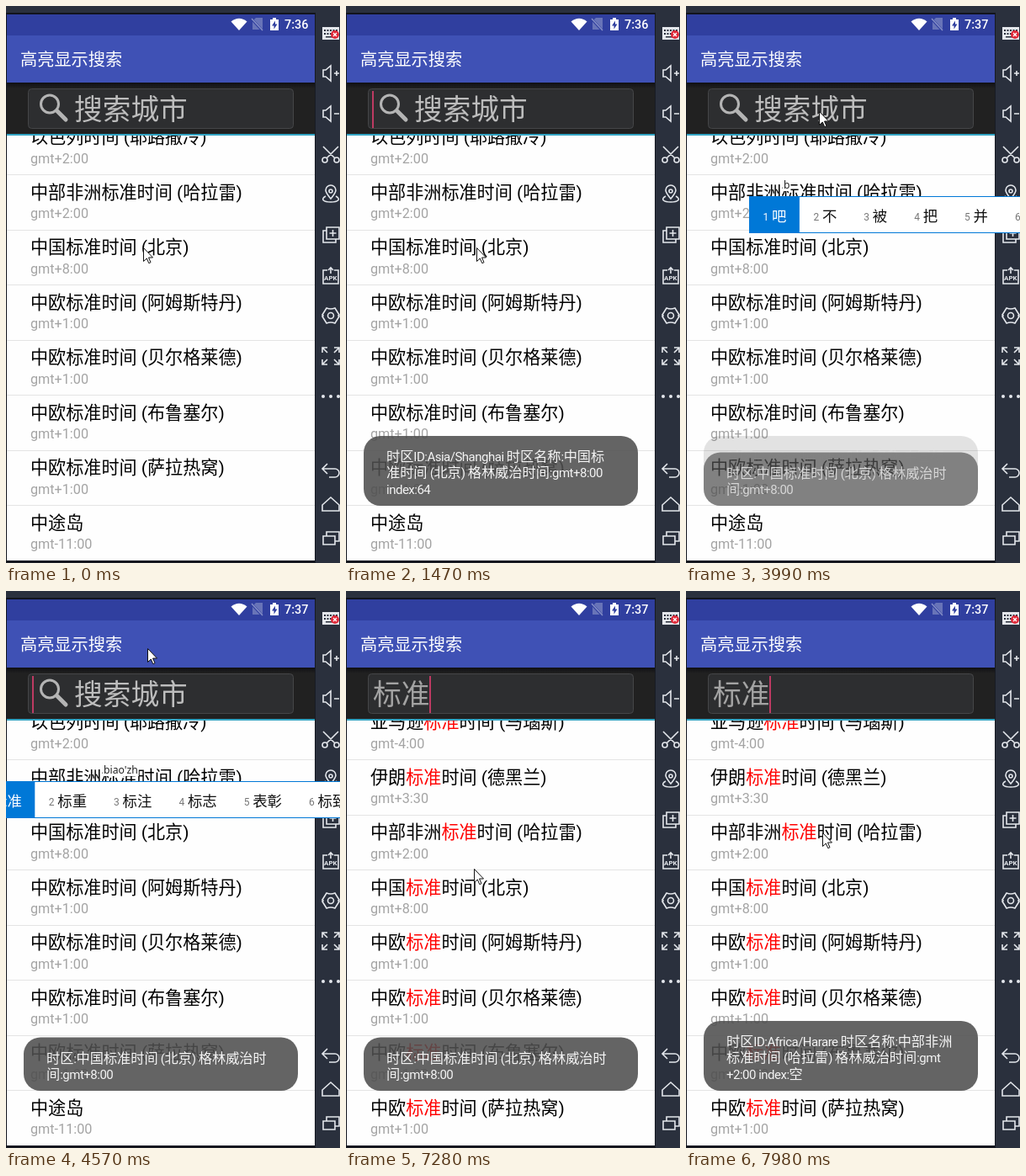
These frames come from a looping animation (397x662 px, 8 s). An HTML page with a canvas:

```html
<!DOCTYPE html>
<html lang="zh-CN">
<head>
<meta charset="utf-8">
<title>高亮显示搜索</title>
<style>
html, body { margin: 0; width: 100%; height: 100%; overflow: hidden; background: #2a303d; }
canvas { display: block; }
</style>
</head>
<body>
<canvas id="stage" width="397" height="662" lang="zh-CN"></canvas>
<script>
const ctx = document.getElementById('stage').getContext('2d');
const LOOP = 8000;
const SANS = "Roboto, 'Noto Sans CJK SC', 'Noto Sans CJK', sans-serif";
const CJK = "'Noto Sans CJK SC', 'Noto Sans CJK', sans-serif";

const zone = (name, city, gmt) => ({ name: name + (city ? ` (${city})` : ''), gmt: 'gmt' + gmt });
const shared = [
  zone('中部非洲标准时间', '哈拉雷', '+2:00'),
  zone('中国标准时间', '北京', '+8:00'),
  ...['阿姆斯特丹', '贝尔格莱德', '布鲁塞尔', '萨拉热窝'].map(c => zone('中欧标准时间', c, '+1:00'))
];
const allZones = [zone('以色列时间', '耶路撒冷', '+2:00'), ...shared, zone('中途岛', '', '-11:00')];
const found = [zone('亚马逊标准时间', '马瑙斯', '-4:00'), zone('伊朗标准时间', '德黑兰', '+3:30'), ...shared];

// Timelines: [start ms, value...]
const pointer = [
  [0, 163, 287], [150, 158, 287], [270, 154, 287], [670, 155, 287],
  [1620, 156, 250], [1740, 157, 195], [1860, 158, 149], [2010, 158, 138], [2130, 158, 131],
  [2410, 158, 127], [2530, 158, 125], [4570, 168, 68],
  [6070, 170, 80], [6190, 169, 130], [6310, 167, 205], [6430, 163, 267],
  [6580, 160, 300], [6700, 159, 328], [6820, 159, 342], [7130, 156, 343], [7280, 152, 330],
  [7430, 158, 303], [7550, 162, 286], [7830, 162, 287]
];
const blinks = [520, 1070, 1470, 2010, 2410, 2960, 3550, 3990, 4570, 5640, 6070, 6580, 7130, 7550, 7980];
const toasts = [
  { lines: ['时区ID:Asia/Shanghai 时区名称:中国标', '准时间 (北京) 格林威治时间:gmt+8:00', 'index:64'],
    alpha: [[0, 0], [520, .5], [670, 1], [3990, .18], [4140, 0]] },
  { lines: ['时区:中国标准时间 (北京) 格林威治时', '间:gmt+8:00'],
    alpha: [[0, 0], [3990, .75], [4140, 1], [7430, .5], [7550, 0]] },
  { lines: ['时区ID:Africa/Harare 时区名称:中部非洲', '标准时间 (哈拉雷) 格林威治时间:gmt', '+2:00 index:空'],
    alpha: [[0, 0], [7830, .5], [7980, 1]] }
];
const input = [
  [0], [3990, 75, 'b', '吧 不 被 把 并 本'], [4140, 75, 'bi', '比 必 笔 币 避 本'],
  [4290, 58, 'biao', '表 标 表示 表现 表达 彪'],
  [4570, -43, "biao'zh", '标准 标重 标注 标志 表彰 标致'],
  [4690, 75, "biao'zhu", '标注 表 标 彪 飙 裱'], [4840, 75, "biao'zhun", '标准 表 标 彪 飙 裱'], [4990]
];

const at = (steps, t) => steps.filter(s => s[0] <= t).pop().slice(1);

function rect(x, y, w, h, color) {
  ctx.fillStyle = color;
  ctx.fillRect(x, y, w, h);
}

function text(str, x, y, size, color, family = SANS, weight = 400) {
  ctx.font = `${weight} ${size}px ${family}`;
  ctx.fillStyle = color;
  ctx.fillText(str, x, y);
  return x + ctx.measureText(str).width;
}

function panel(x, y, w, h, r, fill, line) {
  ctx.beginPath();
  ctx.roundRect(x, y, w, h, r);
  ctx.fillStyle = fill;
  ctx.fill();
  if (line) stroke(null, line, 1);
}

function stroke(d, color, width) {
  ctx.strokeStyle = color;
  ctx.lineWidth = width;
  d ? ctx.stroke(new Path2D(d)) : ctx.stroke();
}

function fill(d, color) {
  ctx.fillStyle = color;
  ctx.fill(new Path2D(d));
}

function moved(x, y, draw) {
  ctx.save();
  ctx.translate(x, y);
  draw();
  ctx.restore();
}

const ring = (x, y, r) => `M${x - r} ${y}a${r} ${r} 0 1 0 ${2 * r} 0a${r} ${r} 0 1 0 ${-2 * r} 0`;

const speaker = 'M-9-4h3l6-5v18l-6-5h-3z';
const icons = [
  [80, speaker + 'M4 0h6M7-3v6'],
  [128, speaker + 'M4 0h6'],
  [176, 'M-9-9L5 5M9-9L-5 5' + ring(-7, 7, 3) + ring(7, 7, 3)],
  [224, 'M0 5C-4 0-6-2-6-5a6 6 0 0 1 12 0C6-2 4 0 0 5z' + ring(0, -4, 2) + 'M-6 2C-13 6-8 9 0 9S13 6 6 2'],
  [272, 'M-5-9h15V5H-5zM-5-5h-4V9H6V5M2.500-6v8M-1.500-2h8'],
  [320, 'M-4-6h-5V10H9V-6H4M0 0V-9M-3-6l3-3l3 3'],
  [368, 'M-5-9Q0-7 5-9L10-1Q8 0 10 1L5 9Q0 7-5 9L-10 1Q-8 0-10-1z' + ring(0, 0, 3.5)],
  [416, 'M-10-4v-6h6M-10-10l6 6M4-10h6v6M10-10l-6 6M-10 4v6h6M-10 10l6-6M4 10h6V4M10 10L4 4'],
  [552, 'M-4-8l-6 6l6 6M-10-2H5a5 5 0 0 1 0 10H-2'],
  [592, 'M-10 1L0-8L10 1V8H-10z'],
  [632, 'M-9-2H5V8H-9zM-5-2V-7H10V4H5']
];

function sidebar() {
  const ink = '#e4e7ec';
  rect(367, 0, 30, 662, '#2a303d');
  rect(367, 9, 1, 653, '#171b24');
  for (const [y, d] of icons) moved(386, y, () => stroke(d, ink, 1.6));
  moved(386, 33, () => {
    rect(-10, -8, 20, 15, ink);
    for (let i = 0; i < 10; i++) rect(-8 + i % 5 * 3.5, -5 + (i / 5 | 0) * 4, 2, 2, '#2a303d');
    rect(-6, 3, 9, 1.5, '#2a303d');
    fill(ring(5, 1, 5), '#e02838');
    stroke('M3-1l4 4M7-1l-4 4', '#fff', 1.4);
  });
  rect(378, 318, 16, 9, '#2a303d');
  text('APK', 378, 326, 8, ink, SANS, 700);
  for (const x of [-9, 0, 9]) fill(ring(386 + x, 464, 2), ink);
}

function header(t) {
  rect(0, 0, 397, 8, '#2a303d');
  rect(0, 8, 368, 2, '#11141d');
  rect(1, 10, 366, 25, '#303f9f');
  rect(1, 35, 366, 57, '#3f51b5');
  fill('M267.500 18.500Q277 11 286.500 18.500L277 29z', '#fff');
  fill('M293 18l4-4h8v14h-12z', '#6874b8');
  stroke('M291.500 15l13 14', '#303f9f', 3);
  stroke('M292 15l13 14', '#8791c8', 1.4);
  fill('M314 16h3v-2h4v2h3v13h-10z', '#fff');
  fill('M320 17.500l-4 6h2.500v4l4-6h-2.500z', '#303f9f');
  text(t < 2960 ? '7:36' : '7:37', 331, 27, 14.4, '#fff', SANS, 500);
  text('高亮显示搜索', 17, 71, 20.2, '#fff');
}

function searchBox(t) {
  const typed = t >= 4990;
  rect(1, 91, 366, 61, '#212121');
  const shade = ctx.createLinearGradient(0, 91, 0, 98);
  shade.addColorStop(0, '#101014');
  shade.addColorStop(1, '#212121');
  rect(1, 91, 366, 7, shade);
  panel(26.5, 98.5, 315, 47, 4, '#2d2e30', '#454648');
  rect(1, 152, 366, 2, '#33a5c4');
  if (typed) {
    text('标准', 32, 135, 33.7, '#a3a3a3');
  } else {
    ctx.lineCap = 'round';
    stroke('M61 125l10 10', '#b4b4b4', 5);
    ctx.lineCap = 'butt';
    stroke(ring(52, 116.5, 10.5), '#b4b4b4', 3);
    text('搜索城市', 81, 134.5, 33.7, '#bdbdbd');
  }
  if (blinks.filter(b => b <= t).length % 2) rect(typed ? 99 : 31, 101, 2, 44, '#bd3a62');
}

function list(t) {
  const filtered = t >= 5110;
  ctx.save();
  ctx.beginPath();
  ctx.rect(1, 154, 366, 505);
  ctx.clip();
  rect(1, 154, 366, 505, '#fefefe');
  (filtered ? found : allZones).forEach((row, i) => {
    const y = 134.6 + 65.5 * i;
    rect(1, Math.round(y + 65.5), 366, 1, '#e4e4e4');
    let x = 29;
    for (const part of row.name.split(/(标准)/))
      x = text(part, x, y + 28.7, 21.1, filtered && part === '标准' ? '#f00' : '#000');
    text(row.gmt, 29, y + 52, 16.2, '#a4a4a4');
  });
  ctx.restore();
}

function toast({ lines, alpha }, t) {
  const [a] = at(alpha, t);
  if (!a) return;
  const top = lines.length > 2 ? 511 : 530.5;
  ctx.globalAlpha = a;
  panel(21, top, 326, 594 - top, 20, 'rgba(79,79,79,.88)');
  lines.forEach((line, i) => {
    let x = 48;
    for (const run of line.match(/[ -~]+|[^ -~]+/g)) {
      const latin = run < '\x7f';
      ctx.letterSpacing = latin ? '-0.5px' : '0px';
      x = text(run, x, top + 30 + 19.4 * i, latin ? 15 : 16.2, '#f4f4f4');
    }
  });
  ctx.letterSpacing = '0px';
  ctx.globalAlpha = 1;
}

function candidates(t) {
  let [x, typed, words] = at(input, t);
  if (!typed) return;
  ctx.font = "12.2px 'Noto Sans', sans-serif";
  rect(115, 207, ctx.measureText(typed).width + 2, 13, '#fefefe');
  text(typed, 116, 217, 12.2, '#222', "'Noto Sans', sans-serif");
  rect(x, 226, 397 - x, 44, '#0078d7');
  rect(x + 1, 227, 396 - x, 42, '#fff');
  words.split(' ').forEach((word, i) => {
    const w = 42.5 + 17.4 * word.length;
    if (!i) rect(x, 226, w, 44, '#0078d7');
    text(i + 1, x + 16.5, 255, 12, i ? '#777' : '#fff');
    text(word, x + 27, 255.5, 17.4, i ? '#111' : '#fff', CJK);
    x += w;
  });
}

function arrow(t) {
  moved(...at(pointer, t), () => {
    const d = 'M.500.500V16.500L4.300 13L6.800 18.700L9 17.700L6.500 12H11.500z';
    fill(d, '#fff');
    stroke(d, '#111', 1);
  });
}

function draw(t) {
  rect(0, 0, 397, 662, '#14171f');
  sidebar();
  header(t);
  list(t);
  searchBox(t);
  toasts.forEach(item => toast(item, t));
  candidates(t);
  arrow(t);
}

const start = performance.now();
function frame() {
  draw((performance.now() - start) % LOOP);
  requestAnimationFrame(frame);
}
frame();
</script>
</body>
</html>
```
